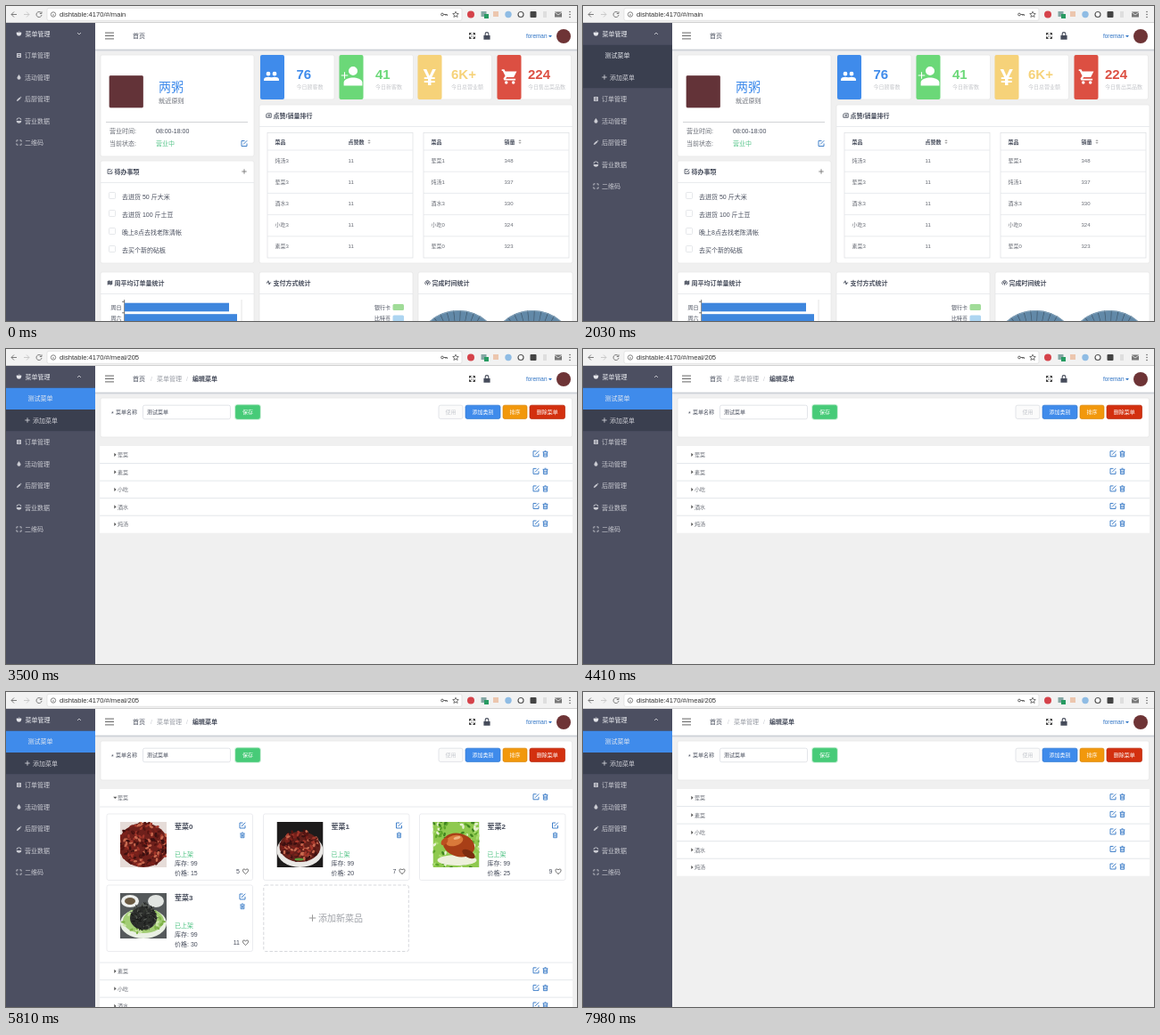
Recreate the animation shown at these times as an HTML page. Size 640 px wide and 354 px high, loop 8 s.

```html
<!DOCTYPE html>
<html lang="zh-CN">
<head>
<meta charset="utf-8">
<title>餐厅后台</title>
<style>
  html, body { margin: 0; width: 100%; height: 100%; overflow: hidden; background: #f0f0f0; }
  #stage { display: block; width: 100vw; height: 100vh; }
  text { font-family: "Liberation Sans", "Noto Sans CJK SC", "Noto Sans CJK", sans-serif; white-space: pre; }
</style>
</head>
<body>
<svg id="stage" viewBox="0 0 640 354"></svg>
<script>
const BLUE = '#3f8beb', LINK = '#2f74c4', GREEN = '#47cb78', INK = '#464c5b', GRAY = '#666a73', LINE = '#e4e6ea';
const LOOP = 8000, SUBMENU_AT = 1300, PAGE_AT = 2950, EXPAND_AT = 4550, COLLAPSE_AT = 6300;
const SUBMENU_H = 49, PANEL_H = 175.5;

// Drawing helpers: each returns SVG markup. Text is placed by its vertical centre.
const rect = (x, y, w, h, fill, extra = '') =>
  `<rect x="${x}" y="${y}" width="${w}" height="${h}" fill="${fill}" ${extra}/>`;
const box = (x, y, w, h, fill, stroke = fill, r = 2) =>
  rect(x, y, w, h, fill, `rx="${r}" stroke="${stroke}" stroke-width=".7"`);
const circle = (x, y, r, fill, extra = '') =>
  `<circle cx="${x}" cy="${y}" r="${r}" fill="${fill}" ${extra}/>`;
const ellipse = (x, y, rx, ry, fill, turn = 0) =>
  `<ellipse rx="${rx}" ry="${ry}" fill="${fill}" transform="translate(${x} ${y}) rotate(${turn})"/>`;
const text = (x, y, str, size = 7, fill = INK, extra = '') =>
  `<text x="${x}" y="${y + size * .37}" font-size="${size}" fill="${fill}" ${extra}>${str}</text>`;
const bold = (x, y, str, size = 7, fill = INK) => text(x, y, str, size, fill, 'font-weight="700"');
const line = (x1, y1, x2, y2, color = LINE, w = .8) =>
  `<path d="M${x1} ${y1}L${x2} ${y2}" stroke="${color}" stroke-width="${w}"/>`;
const card = (x, y, w, h) => box(x, y, w, h, '#fff', '#e6e6e6');
const list = (items, draw) => items.map(draw).join('');

const strokes = {
  edit: 'M.5-3H-3V3H3V0M-1 1L3.3-3.3',
  trash: 'M-3-2.4H3M-2.2-2.4V3.2H2.2V-2.4M-1-3.5H1M-.7-1V2M.7-1V2',
  heart: 'M0 3C-5-.5-3-4.2 0-1.6C3-4.2 5-.5 0 3Z',
  plus: 'M-2.7 0H2.7M0-2.7V2.7',
  corners: 'M-3-1V-3H-1M1-3H3V-1M3 1V3H1M-1 3H-3V1',
  expand: 'M-3-.8V-3H-.8M-3-3L-.7-.7M.8-3H3V-.8M3-3L.7-.7M3 .8V3H.8M3 3L.7.7M-.8 3H-3V.8M-3 3L-.7.7',
  check: 'M2.6 0V2.7H-2.7V-2.7H1M-1.2-.4L0 .9L3-2.7',
  chevron: 'M-2-1L0 1L2-1',
  back: 'M3 0H-3M0-3L-3 0L0 3',
  forward: 'M-3 0H3M0-3L3 0L0 3',
  reload: 'M2.4-1.8A3 3 0 1 0 3 .5M3-3.2V-1H.8',
  key: 'M-.6 0H3.4V1.6M1.8 0V1.4M-.6 0A1.4 1.4 0 1 1-3.4 0A1.4 1.4 0 1 1-.6 0',
  star: 'M0-3.3L1 -1L3.3-.9L1.5.6L2.1 3L0 1.6L-2.1 3L-1.5.6L-3.3-.9L-1-1Z',
  pulse: 'M-3 0H-1.5L-.6-2.5L.6 2.3L1.3 0H3',
  bars: 'M-5-3.4H5M-5 0H5M-5 3.4H5',
  clip: 'M-3-1.5L-1.5-2.5H3V2.5H-3ZM-1-.5H1.5M-1 1H1.5',
  dial: 'M-2 2.6A3 3 0 1 1 2 2.6M-1 1A1.4 1.4 0 1 1 1 1M0 0V3'
};
const solids = {
  fruit: 'M-3.2-1.2C-2-2.2-.8-1.7 0-1.3C.8-1.7 2-2.2 3.2-1.2C3 1.6 1.7 3 0 2.8C-1.7 3-3 1.6-3.2-1.2ZM-.2-1.8L.4-3.5L1-2Z',
  form: 'M-2.8-2.8H2.8V2.8H-2.8ZM-1.5-1.4V-.7H1.5V-1.4ZM-1.5.6V1.3H1.5V.6Z',
  drop: 'M0-3.5C1.4-1.6 2.3-.3 2.3 1A2.3 2.3 0 0 1-2.3 1C-2.3-.3-1.4-1.6 0-3.5Z',
  pencil: 'M-3 3L-2.4 1L1-2.4L2.4-1L-1 2.4ZM1.5-3L3-1.5L3.3-2.4L2.4-3.3Z',
  bowl: 'M-3.2 0H3.2A3.2 3.2 0 0 1-3.2 0ZM-3.2-.8A3.2 3.2 0 0 1 3.2-.8L2.4-.8A2.4 2.4 0 0 0-2.4-.8Z',
  map: 'M-3-2L-1-3V2L-3 3ZM-.7-3L.8-2V3L-.7 2ZM1.1-2L3-3V2L1.1 3Z',
  caret: 'M-2-1.1H2L0 1.3Z',
  triangle: 'M-1-2.1L1.3 0L-1 2.1Z',
  sort: 'M-1.7-.6H1.7L0-2.5ZM-1.7.6H1.7L0 2.5Z',
  lock: 'M-3.6-.6H-2.4V-2A2.4 2.4 0 0 1 2.4-2V-.6H3.6V4.3H-3.6ZM-1.3-.6H1.3V-2A1.3 1.3 0 0 0-1.3-2Z',
  person: 'M-2.5-3A2.5 2.5 0 1 1 2.5-3A2.5 2.5 0 1 1-2.5-3ZM-5.2 5.2V3.4C-5 1.6-2 .8 0 .8C2 .8 5 1.6 5.2 3.4V5.2Z',
  cart: 'M-8-7H-5.5L-4.4-5H7.2L4.2.8H-3L-4 2.4H6V4H-5.5L-6.4 2.6L-4.5-.4L-7-5.4H-8ZM-5 6.3A1.6 1.6 0 1 1-1.8 6.3A1.6 1.6 0 1 1-5 6.3ZM2.2 6.3A1.6 1.6 0 1 1 5.4 6.3A1.6 1.6 0 1 1 2.2 6.3Z'
};
const icon = (name, x, y, color, scale = 1, attrs = '') => {
  const paint = solids[name] ? `fill="${color}" fill-rule="evenodd"`
    : `fill="none" stroke="${color}" stroke-width="${.9 / Math.sqrt(scale)}"`;
  return `<g transform="translate(${x} ${y}) scale(${scale})"><path ${attrs} d="${solids[name] || strokes[name]}" ${paint}/></g>`;
};

function browserBar() {
  return rect(0, 0, 640, 18.5, '#f2f2f2') + line(0, 18.5, 640, 18.5, '#c9c9c9')
    + icon('back', 9, 9.5, '#707070') + icon('forward', 23, 9.5, '#c6c6c6') + icon('reload', 37, 9.5, '#707070')
    + box(46, 2.3, 465, 14, '#fff', '#dcdcdc')
    + circle(53, 9.5, 2.7, 'none', 'stroke="#666" stroke-width=".8"') + line(53, 9, 53, 11, '#666')
    + '<text id="url" x="60" y="12.2" font-size="7.6" fill="#333"></text>'
    + icon('key', 491, 9.5, '#555') + icon('star', 504, 9.5, '#666')
    + circle(521, 9.5, 4, '#d5424a') + rect(532.5, 6, 6, 6, '#84a7a4') + rect(536, 9, 5, 5, '#279b62')
    + rect(546, 6, 6, 6, '#ecc6ae') + circle(563, 9.5, 3.7, '#8fbce4')
    + circle(577, 9.5, 3, '#fff', 'stroke="#555" stroke-width="1.2"')
    + rect(587.5, 6, 7, 7, '#444', 'rx="1"') + rect(602, 6, 4, 7, '#dedede')
    + rect(615, 6.5, 8, 6, '#777') + '<path d="M615 7L619 10L623 7" fill="none" stroke="#eee" stroke-width=".8"/>'
    + list([6.5, 9.5, 12.5], y => circle(632, y, .8, '#666'));
}

function header() {
  return rect(100, 50, 540, 1.2, '#e3e5e8') + rect(100, 19, 540, 30, '#fff') + rect(100, 48.6, 540, 1.4, '#ccd0d6')
    + icon('bars', 116, 33.5, '#555') + text(142, 33.5, '首页')
    + '<g id="crumbs">' + text(162, 33.5, '/', 7, '#c8cad0') + text(169, 33.5, '菜单管理', 7, '#969aa3')
    + text(202, 33.5, '/', 7, '#c8cad0') + bold(209, 33.5, '编辑菜单') + '</g>'
    + icon('expand', 522.5, 33.5, '#333') + icon('lock', 539, 33.5, INK)
    + text(583, 34, 'foreman', 6.4, LINK) + icon('caret', 610, 34, LINK) + circle(625, 34, 8, '#6e3436');
}

function sidebar() {
  const soft = '#cbccd3';
  const entries = [['form', '订单管理'], ['drop', '活动管理'], ['pencil', '后厨管理'], ['bowl', '营业数据'], ['corners', '二维码']];
  return rect(0, 19, 100, 335, '#4c4f61')
    + icon('fruit', 14.5, 31, '#e4e5ea', .9) + text(21.5, 31, '菜单管理', 7, '#eceef2')
    + icon('chevron', 82, 31, soft, 1, 'id="chevron"')
    + `<svg id="submenu" x="0" y="43.5" width="100" height="0">` + rect(0, 0, 100, SUBMENU_H, '#3a3f4f')
    + rect(0, 0, 100, 24.5, BLUE, 'id="active"') + text(24.5, 12.2, '测试菜单', 7, '#e8ebf0')
    + icon('plus', 24, 36.5, soft) + text(30, 36.5, '添加菜单', 7, soft) + '</svg>'
    + '<g id="entries">' + list(entries, ([name, label], i) =>
      icon(name, 14.5, 55.5 + i * 24.5, soft, .87) + text(21, 55.5 + i * 24.5, label, 7, soft)) + '</g>';
}

function statCard(x, color, number, label, art) {
  const left = x + 55.5 - label.length * 3;
  return card(x, 55, 83, 50) + rect(x, 55, 27, 50, color, 'rx="2"') + art
    + bold(left, 76, number, 15, color) + text(left, 91, label, 6, '#c4c6ca');
}

function table(x, columns, rows) {
  return box(x, 142.5, 163, 140.5, '#fff', '#dcdee2', 0)
    + bold(x + 8.5, 152.5, columns[0], 6) + bold(x + 90.5, 152.5, columns[1], 6)
    + icon('sort', x + 94 + columns[1].length * 6 + 2, 152.5, '#aaa')
    + list(rows, ([name, count], i) => line(x, 162 + i * 24.2, x + 163, 162 + i * 24.2)
      + text(x + 8.5, 174 + i * 24, name, 6, GRAY) + text(x + 90.5, 174 + i * 24, count, 6, GRAY));
}
function zip(names, counts) {
  const values = counts.split(' ');
  return names.split(' ').map((name, i) => [name, values[i]]);
}

function homePage() {
  const person = (x, y, s) => icon('person', x, y, '#fff', s);
  const titled = (x, y, w, h, art, title) => card(x, y, w, h) + icon(art, x + 10.5, y + 12, INK, .9)
    + bold(x + 15.5, y + 12, title) + line(x, y + 24.5, x + w, y + 24.5);
  const gauge = x => circle(x, 391, 43, 'none', 'stroke="#6289a8" stroke-width="12"')
    + circle(x, 391, 43, 'none', 'stroke="#40586c" stroke-width="12" stroke-dasharray=".7 6.1"')
    + circle(x, 391, 48.5, 'none', 'stroke="#85a2b8" stroke-width="1"');
  return card(106, 55, 172, 114) + box(116, 78.5, 37.5, 35.5, '#633338', '#633338', 1)
    + text(171, 91, '两粥', 14, BLUE) + text(171, 106, '就近原则', 7.2, GRAY) + line(112, 130.5, 271, 130.5, '#c6c8cc')
    + text(116, 140, '营业时间:', 7, GRAY) + text(168, 140, '08:00-18:00')
    + text(116, 154.5, '当前状态:', 7, GRAY) + text(168, 154.5, '营业中', 7, '#57c58a') + icon('edit', 267, 154.5, LINK)
    + titled(106, 174, 172, 115, 'check', '待办事项') + icon('plus', 267, 186, '#777')
    + list(['去进货 50 斤大米', '去进货 100 斤土豆', '晚上8点去找老陈清帐', '去买个新的砧板'], (task, i) =>
      box(115.5, 209.5 + i * 20, 7, 7, '#fff', '#dcdee2', 1) + text(130, 214 + i * 20, task))
    + statCard(285, BLUE, '76', '今日顾客数', person(301, 79, .95) + person(294, 79, .95))
    + statCard(373.5, '#6bd878', '41', '今日新客数', person(389, 79, 2) + icon('plus', 379.5, 78, '#fff', 1.4))
    + statCard(461.5, '#f6d279', '6K+', '今日总营业额', bold(467.5, 79, '¥', 26, '#fff'))
    + statCard(550.5, '#dc4f42', '224', '今日售出菜品数', icon('cart', 564.5, 79, '#fff', 1.1))
    + titled(284, 111, 351, 178, 'clip', '点赞/销量排行')
    + table(293, ['菜品', '点赞数'], zip('炖汤3 荤菜3 酒水3 小吃3 素菜3', '11 11 11 11 11'))
    + table(468, ['菜品', '销量'], zip('荤菜1 炖汤1 酒水3 小吃0 荤菜0', '348 337 330 324 323'))
    + titled(106, 299, 172, 60, 'map', '周平均订单量统计') + titled(284, 299, 172, 60, 'pulse', '支付方式统计')
    + titled(462, 299, 173, 60, 'dial', '完成时间统计')
    + line(264, 330, 264, 354, '#ddd') + line(132.7, 330, 132.7, 354, '#555')
    + list([['周日', 117], ['周六', 126]], ([day, width], i) => text(117.5, 338.5 + i * 12.5, day, 6)
      + line(130, 332.3 + i * 12.5, 133, 332.3 + i * 12.5, '#555') + rect(133, 333.7 + i * 12.5, width, 9.6, '#3e86dd'))
    + list([['银行卡', '#a0dc98'], ['比特币', '#add5f1']], ([label, color], i) =>
      text(413, 338.5 + i * 12.5, label, 6) + rect(433.5, 335 + i * 12.5, 12.5, 7, color, 'rx="1.5"'))
    + gauge(507) + gauge(590);
}

// Seeded scatter of morsels inside an oval.
function scatter(count, x, y, rx, ry, colors, seed, thin = 1) {
  const random = () => (seed = seed * 16807 % 2147483647) / 2147483647;
  return Array.from({ length: count }, (_, i) => {
    const angle = random() * 6.283, r = Math.sqrt(random());
    return ellipse((x + rx * r * Math.cos(angle)).toFixed(1), (y + ry * r * Math.sin(angle)).toFixed(1),
      2.3, 1.3 * thin, colors[i % colors.length], Math.round(random() * 180));
  }).join('');
}
const chili = ['#a3362a', '#3d1010', '#c9694f', '#7c211b', '#551512'];
const photos = [
  rect(0, 0, 52, 51, '#e6dcd8') + ellipse(26, 26, 28, 25, '#6e201b') + scatter(190, 26, 26, 28, 25, chili, 11),
  rect(0, 0, 52, 51, '#1d1b1b') + ellipse(26, 32, 26, 19, '#e9e7e4') + ellipse(26, 28, 23, 17, '#64201a')
    + scatter(120, 26, 27, 22, 17, chili, 23) + ellipse(25, 42, 5, 1.5, '#5b9a3c'),
  rect(0, 0, 52, 51, '#8fc94f') + scatter(120, 26, 26, 36, 36, ['#5da52a', '#e6f1cf', '#a9dc6c', '#3f8420'], 31)
    + ellipse(27, 43, 22, 6, '#eef0dc') + ellipse(29, 26, 18, 13, '#a83f17', 15)
    + ellipse(24, 21, 10, 6, '#d9793a', -15) + ellipse(13, 22, 5, 3, '#bc4f20', -50)
    + ellipse(40, 36, 8, 4, '#7c2c10', 30) + ellipse(27, 18, 4, 1.5, '#f0b582', -15),
  rect(0, 0, 52, 51, '#55595b') + ellipse(11, 9, 10, 7, '#eef0ee') + ellipse(11, 9, 6, 4, '#6a5a43')
    + ellipse(40, 9, 9, 7, '#e2e5e2') + ellipse(26, 34, 26, 17, '#eaf0e4') + ellipse(26, 31, 23, 14, '#a3cd75')
    + scatter(40, 26, 32, 23, 13, ['#7fb248', '#cfe6ad'], 53) + ellipse(26, 28, 15, 13, '#2b2d2b')
    + scatter(90, 26, 26, 15, 16, ['#161816', '#5d615a', '#343832', '#222'], 47, .4)
];

function dishCard(i) {
  const x = [113, 288.5, 463.5][i % 3], y = i < 3 ? 137 : 217, likes = 5 + i * 2;
  return box(x, y, 163.5, 74.5, '#fff', '#e2e4e8')
    + `<svg x="${x + 15}" y="${y + 9}" width="52" height="51">${photos[i]}</svg>`
    + bold(x + 76, y + 14, '荤菜' + i, 8) + text(x + 76, y + 45, '已上架', 7, '#4fc283')
    + text(x + 76, y + 55.5, '库存: 99') + text(x + 76, y + 66, '价格: ' + (15 + i * 5))
    + icon('edit', x + 152, y + 13, LINK) + icon('trash', x + 152, y + 24, LINK, .85)
    + text(x + 149, y + 64.5, likes, 7, INK, 'text-anchor="end"') + icon('heart', x + 155.5, y + 64.5, '#555');
}

function menuPage() {
  const button = (x, w, label, fill, border, ink = '#fff') =>
    box(x, 63.2, w, 15.2, fill, border) + text(x + w / 2, 71, label, 6, ink, 'text-anchor="middle"');
  const row = (name, i) => {
    const y = 118.8 + i * 19.55;
    return rect(105, y - 9.8, 530, 19.55, '#fff') + (i ? line(105, y - 9.8, 635, y - 9.8, '#dfe2e7') : '')
      + icon('triangle', 122.3, y, '#555', 1, i ? '' : 'id="arrow"') + text(125, y, name, 6, GRAY)
      + icon('edit', 594, y - 1, LINK) + icon('trash', 604.5, y - .8, LINK, .95);
  };
  const [first, ...others] = ['荤菜', '素菜', '小吃', '酒水', '炖汤'];
  return card(106, 55, 528.5, 44) + text(118, 72, '*', 7) + text(123, 71, '菜单名称', 6)
    + box(153.5, 63.2, 98, 15.5, '#fff', '#d7dae0') + text(158, 71, '测试菜单', 6)
    + box(256.6, 62.6, 28.8, 16.6, '#c4edd3') + button(257.5, 27, '保存', GREEN, GREEN)
    + button(485, 27, '使用', '#fbfbfb', '#d7dae0', '#c5c8ce') + button(515, 39, '添加类别', BLUE, '#2f78d0')
    + button(557, 27, '排序', '#f2980c', '#d98508') + button(587, 39.5, '删除菜单', '#d3300f', '#b5260a')
    + row(first, 0)
    + `<svg id="panel" x="0" y="128.5" width="640" height="0"><g transform="translate(0 -128.5)">`
    + rect(105, 128.5, 530, PANEL_H, '#fff') + line(105, 129, 635, 129, '#dfe2e7') + list([0, 1, 2, 3], dishCard)
    + rect(288.8, 217, 162.5, 74.5, '#fff', 'rx="2" stroke="#d6d8dc" stroke-width="1" stroke-dasharray="3.5 2"')
    + icon('plus', 343.5, 254, '#999', 1.4) + text(350, 254, '添加新菜品', 10, '#9fa2a8') + '</g></svg>'
    + '<g id="rows">' + list(others, (name, i) => row(name, i + 1)) + '</g>';
}

const stage = document.getElementById('stage');
stage.innerHTML = rect(0, 0, 640, 354, '#f0f0f0')
  + `<g id="home">${homePage()}</g><g id="menu">${menuPage()}</g>`
  + header() + sidebar() + browserBar();

const el = id => document.getElementById(id);
const show = (id, on) => el(id).setAttribute('display', on ? 'inline' : 'none');
const move = (id, value) => el(id).setAttribute('transform', value);
const ease = (t, start, duration = 220) => {
  const p = Math.min(1, Math.max(0, (t - start) / duration));
  return p * p * (3 - 2 * p);
};

function render() {
  const t = performance.now() % LOOP;
  const onMenu = t >= PAGE_AT;
  const submenu = ease(t, SUBMENU_AT);
  const panel = ease(t, EXPAND_AT) - ease(t, COLLAPSE_AT);

  show('home', !onMenu);
  for (const id of ['menu', 'crumbs', 'active']) show(id, onMenu);
  el('url').textContent = onMenu ? 'dishtable:4170/#/meal/205' : 'dishtable:4170/#/main';

  el('submenu').setAttribute('height', SUBMENU_H * submenu);
  move('entries', `translate(0 ${SUBMENU_H * submenu})`);
  move('chevron', `rotate(${180 * submenu})`);

  el('panel').setAttribute('height', PANEL_H * panel);
  move('rows', `translate(0 ${PANEL_H * panel})`);
  move('arrow', `rotate(${90 * panel})`);
  requestAnimationFrame(render);
}
render();
</script>
</body>
</html>
```
